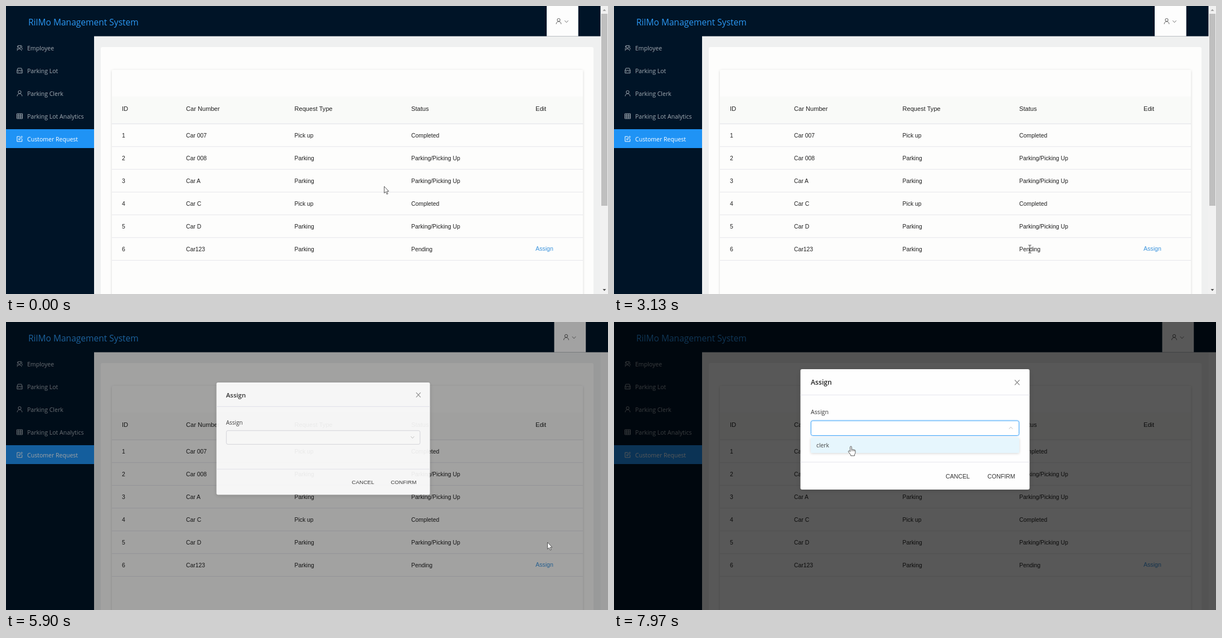
Write an HTML page that moves like this. It is 1080x519 px and loops after 8000 ms.

```html
<!DOCTYPE html>
<html lang="en">
<head>
<meta charset="utf-8">
<title>Customer requests</title>
<style>
  html, body { margin: 0; width: 100%; height: 100%; overflow: hidden; background: #eff0f0; }
  svg { display: block; width: 100%; height: 100%; }
  .ui { font-family: "Open Sans", "Noto Sans", sans-serif; }
  .table { font-family: "Liberation Sans", Arial, sans-serif; }
  .icon { fill: none; stroke-width: 1; stroke-linejoin: round; }
</style>
</head>
<body>
<svg id="stage" viewBox="0 0 1080 519" xmlns="http://www.w3.org/2000/svg"></svg>
<script>
const LOOP = 8000;
const SELECT_AT = 3250, DESELECT_AT = 4850, MODAL_AT = 5790, DROP_AT = 7250;
const HEADER = 54.5, VIEW_RIGHT = 1066.5, SCROLLBAR = 13.5;
const BLUE = '#1f93f5', NAVY = '#001427', INK = '#1e1e1e';
const stage = document.getElementById('stage');

const rect = (x, y, w, h, fill, extra = '') =>
  `<rect x="${x}" y="${y}" width="${w}" height="${h}" fill="${fill}" ${extra}/>`;
const text = (x, y, size, fill, str, kind = 'table', extra = '') =>
  `<text class="${kind}" x="${x}" y="${y}" font-size="${size}" fill="${fill}" ${extra}>${str}</text>`;
const hline = (x1, x2, y, color) =>
  `<path d="M${x1} ${y}H${x2}" stroke="${color}"/>`;
const icon = (x, y, d, color) =>
  `<path class="icon" transform="translate(${x} ${y})" d="${d}" stroke="${color}"/>`;

const ICONS = {
  user: 'M-2.6 -2.4a2.6 2.6 0 1 0 5.2 0a2.6 2.6 0 1 0 -5.2 0M-4.4 5a4.4 4.6 0 0 1 8.8 0',
  team: 'M-2.8 -2a2.4 2.4 0 1 0 4.8 0a2.4 2.4 0 1 0 -4.8 0M-4.6 5a4.2 4.4 0 0 1 8.2 0M-2.6 -4.4a2.4 2.4 0 0 0 -.8 3.8M-5 2.5l1.6 -2M1.6 -4.6a2.4 2.4 0 0 1 1.6 4.2q1.6 1 1.8 3',
  car: 'M-4.6 -.6L-3.2 -4.4H3.2L4.6 -.6V4.4H-4.6ZM-4.6 -.4H4.6M-3 2H-1.6M1.6 2H3',
  table: 'M-5 -4.4H5V4.4H-5ZM-5 -1.5H5M-5 1.5H5M-1.7 -4.4V4.4M1.7 -4.4V4.4',
  form: 'M.5 -4.3H-4.6V4.6H4.3V-.3M-1.6 1.6L-1.2 -.6L3.8 -5L5 -3.8L.4 1.2Z',
  chevron: 'M-3.2 -1.8L0 1.8L3.2 -1.8'
};

const menu = [['team', 'Employee'], ['car', 'Parking Lot'], ['user', 'Parking Clerk'],
  ['table', 'Parking Lot Analytics'], ['form', 'Customer Request']];
const columns = [208, 323, 517.5, 727, 950];
const headings = ['ID', 'Car Number', 'Request Type', 'Status', 'Edit'];
const BUSY = 'Parking/Picking Up';
const rows = [['Car 007', 'Pick up', 'Completed'], ['Car 008', 'Parking', BUSY],
  ['Car A', 'Parking', BUSY], ['Car C', 'Pick up', 'Completed'],
  ['Car D', 'Parking', BUSY], ['Car123', 'Parking', 'Pending']];

function sidebar() {
  return rect(0, 0, 158, 519, NAVY) + menu.map(([name, label], i) => {
    const y = 75.5 + 41 * i, active = i === 4, color = active ? '#fff' : '#a3abb3';
    return (active ? rect(0, 222, 158, 34, BLUE) : '') +
      icon(24.5, y, ICONS[name], color) + text(38, y + 4, 10.55, color, label, 'ui');
  }).join('');
}

function table() {
  const head = headings.map((label, i) => text(columns[i], 188.6, 11.1, INK, label)).join('');
  const body = rows.map((row, i) => {
    const y = 236.5 + 41 * i;
    return [i + 1, ...row].map((cell, c) =>
      text(columns[c], y, 10.4, INK, cell, 'table', cell === 'Pending' ? 'id="pending"' : '')
    ).join('') + hline(190, 1035, 253.3 + 41 * i, '#e5e5ea');
  }).join('');
  return rect(190, 163, 845, 49, '#f9faf8') + hline(190, 1035, 212.3, '#e0e0e6') + head +
    rect(727, 429, 38, 17, '#2f8ff0', 'id="selection"') + body +
    text(950, 441.3, 10.6, '#3a93dd', 'Assign');
}

function scrollbar() {
  return `<g id="scrollbar">${rect(VIEW_RIGHT, 0, SCROLLBAR, 519, '#f1f1f1')}${rect(1068, 14, 11, 346, '#bfbfbf')}
    <path d="M1070.5 9L1073.5 5.5L1076.5 9Z" fill="#a3a3a3"/>
    <path d="M1070.5 510L1073.5 513.5L1076.5 510Z" fill="#505050"/></g>`;
}

function modal() {
  return `<g id="modal">
    ${rect(334.5, 85, 411, 217, '#fefefe', 'rx="3" filter="url(#shadow)"')}
    ${text(353, 113.4, 12.2, '#262626', 'Assign', 'ui', 'font-weight="600"')}
    <path d="M719 104.5L727.5 113.5M727.5 104.5L719 113.5" stroke="#8c8c8c" stroke-width="1.2"/>
    ${hline(334.5, 745.5, 131.5, '#e6e6ee')}
    ${text(353, 166.3, 10.65, '#333', 'Assign', 'ui')}
    ${rect(353.5, 178, 373, 26.5, '#fff', 'id="field" rx="3"')}
    <g id="caret">${icon(0, 0, ICONS.chevron, '#bdbdbd')}</g>
    ${hline(334.5, 745.5, 252.5, '#e6e6ee')}
    ${text(595, 281.5, 10.65, '#333', 'CANCEL')}
    ${text(670, 281.5, 10.65, '#333', 'CONFIRM')}
    <g id="dropdown">${rect(353, 208.5, 374, 27.5, '#e6f6fd', 'rx="2" filter="url(#soft)"')}
      ${text(363, 226.3, 10.3, '#444', 'clerk', 'ui')}</g>
  </g>`;
}

function cursors() {
  const shape = (id, d) =>
    `<path id="${id}" d="${d}" fill="#fff" stroke="#444" stroke-width=".9" stroke-linejoin="round"/>`;
  return `<g id="cursor">
    ${shape('arrow', 'M0 0V12.2L2.7 9.7L4.7 14.2L6.6 13.4L4.6 9H8.3Z')}
    <g id="hand">${shape('palm', 'M-1.3 .8Q0 -1.2 1.3 .8V6Q2.4 4.7 3.7 6.2Q5 5.2 6 6.8Q7.7 6 8 8V11.5Q7.6 13.5 6.6 14.5V17H-.3V15.5L-4.6 9.8Q-4.8 7.6 -2.7 8.3L-1.3 9.7Z')}
      <path d="M1.3 6V9M3.7 6.2V9M6 6.8V9.3" stroke="#444" stroke-width=".7"/></g>
    <path id="beam" d="M-2.5 -7H-.8L0 -6.4L.8 -7H2.5M0 -6.4V6.4M-2.5 7H-.8L0 6.4L.8 7H2.5" fill="none" stroke="#333"/>
  </g>`;
}

stage.innerHTML = `
  <defs>
    <filter id="soft" x="-5%" y="-20%" width="110%" height="150%">
      <feDropShadow dx="0" dy="1" stdDeviation="2" flood-opacity=".16"/></filter>
    <filter id="shadow" x="-5%" y="-5%" width="110%" height="115%">
      <feDropShadow dx="0" dy="2" stdDeviation="4" flood-opacity=".15"/></filter>
  </defs>
  ${rect(0, 0, 1080, 519, '#eff0f0')}
  ${rect(VIEW_RIGHT, HEADER, SCROLLBAR, 519 - HEADER, '#f6f6f6')}
  ${rect(170, 74, 884, 460, '#fdfdfc', 'rx="3"')}
  ${rect(190, 115, 845, 430, '#fdfdfc', 'rx="3" filter="url(#soft)"')}
  ${table()}
  ${rect(0, 0, 1080, HEADER, NAVY)}
  ${sidebar()}
  ${text(40, 35, 15.55, '#2b98f3', 'RilMo Management System', 'ui')}
  <g id="account">${rect(970, 0, 56.7, HEADER, '#fdfdfd')}
    ${icon(991.5, 27.5, ICONS.user, '#555')}${icon(1005.5, 28, ICONS.chevron, '#777')}</g>
  ${scrollbar()}
  ${rect(0, 0, 1080, 519, '#000', 'id="mask"')}
  ${modal()}
  ${cursors()}`;

const ui = Object.fromEntries([...stage.querySelectorAll('[id]')].map(el => [el.id, el]));
const set = (el, attrs) => { for (const k in attrs) el.setAttribute(k, attrs[k]); };
const show = (el, on) => set(el, { visibility: on ? 'visible' : 'hidden' });
const clamp = v => Math.min(1, Math.max(0, v));
const smooth = p => p * p * (3 - 2 * p);

// cubic-bezier(.08, .82, .17, 1)
function easeOutCirc(x) {
  const curve = (u, a, b) => 3 * (1 - u) ** 2 * u * a + 3 * (1 - u) * u * u * b + u ** 3;
  let lo = 0, hi = 1;
  for (let i = 0; i < 24; i++) {
    const mid = (lo + hi) / 2;
    if (curve(mid, .08, .17) < x) lo = mid; else hi = mid;
  }
  return curve(lo, .82, 1);
}

// time, x, y of the pointer
const path = [
  [0, 678.5, 325], [900, 678.5, 325], [1900, 970, 437], [2600, 970, 437],
  [3050, 746, 438], [3500, 746, 438], [4000, 965, 437], [5100, 965, 437],
  [5450, 963, 435], [MODAL_AT, 963, 435], [5900, 971.5, 397], [6700, 492, 167],
  [7000, 445, 192], [7400, 445, 192], [7700, 425, 224], [LOOP, 425, 224]
];

function pointer(t) {
  const i = path.findIndex(p => p[0] > t);
  const [t0, x0, y0] = path[i - 1], [t1, x1, y1] = path[i];
  const p = smooth((t - t0) / (t1 - t0));
  return [x0 + (x1 - x0) * p, y0 + (y1 - y0) * p];
}

function cursorKind(x, y, t) {
  const inside = (l, top, r, b) => x >= l && x <= r && y >= top && y <= b;
  if (t >= MODAL_AT) {
    return inside(353, 178, 727, t >= DROP_AT ? 236 : 205) ? 'hand' : 'arrow';
  }
  if (inside(950, 430, 982, 446)) return 'hand';
  return inside(727, 430, 765, 446) ? 'beam' : 'arrow';
}

function render(t) {
  const selected = t >= SELECT_AT && t < DESELECT_AT;
  show(ui.selection, selected);
  set(ui.pending, { fill: selected ? '#fff' : INK });

  const open = t >= MODAL_AT;
  show(ui.scrollbar, !open);
  set(ui.account, { transform: `translate(${open ? SCROLLBAR : 0} 0)` });
  set(ui.mask, { opacity: .65 * clamp((t - MODAL_AT) / 200) });
  const zoom = easeOutCirc(clamp((t - MODAL_AT) / 300));
  set(ui.modal, {
    opacity: open ? zoom : 0,
    transform: `translate(965 437) scale(${.2 + .8 * zoom}) translate(-965 -437)`
  });

  const focus = t >= DROP_AT, drop = easeOutCirc(clamp((t - DROP_AT) / 200));
  set(ui.field, {
    stroke: focus ? '#49a9f8' : '#d6d6dc',
    style: focus ? 'filter:drop-shadow(0 0 1.5px rgba(24,144,255,.45))' : ''
  });
  set(ui.caret, { transform: `translate(712 191) scale(1 ${1 - 2 * drop})` });
  set(ui.dropdown, {
    opacity: focus ? drop : 0,
    transform: `translate(0 208) scale(1 ${.8 + .2 * drop}) translate(0 -208)`
  });

  const [x, y] = pointer(t), kind = cursorKind(x, y, t);
  set(ui.cursor, { transform: `translate(${x} ${y})` });
  for (const name of ['arrow', 'hand', 'beam']) show(ui[name], name === kind);
}

const start = performance.now();
function tick() {
  render((performance.now() - start) % LOOP);
  requestAnimationFrame(tick);
}
tick();
</script>
</body>
</html>
```
